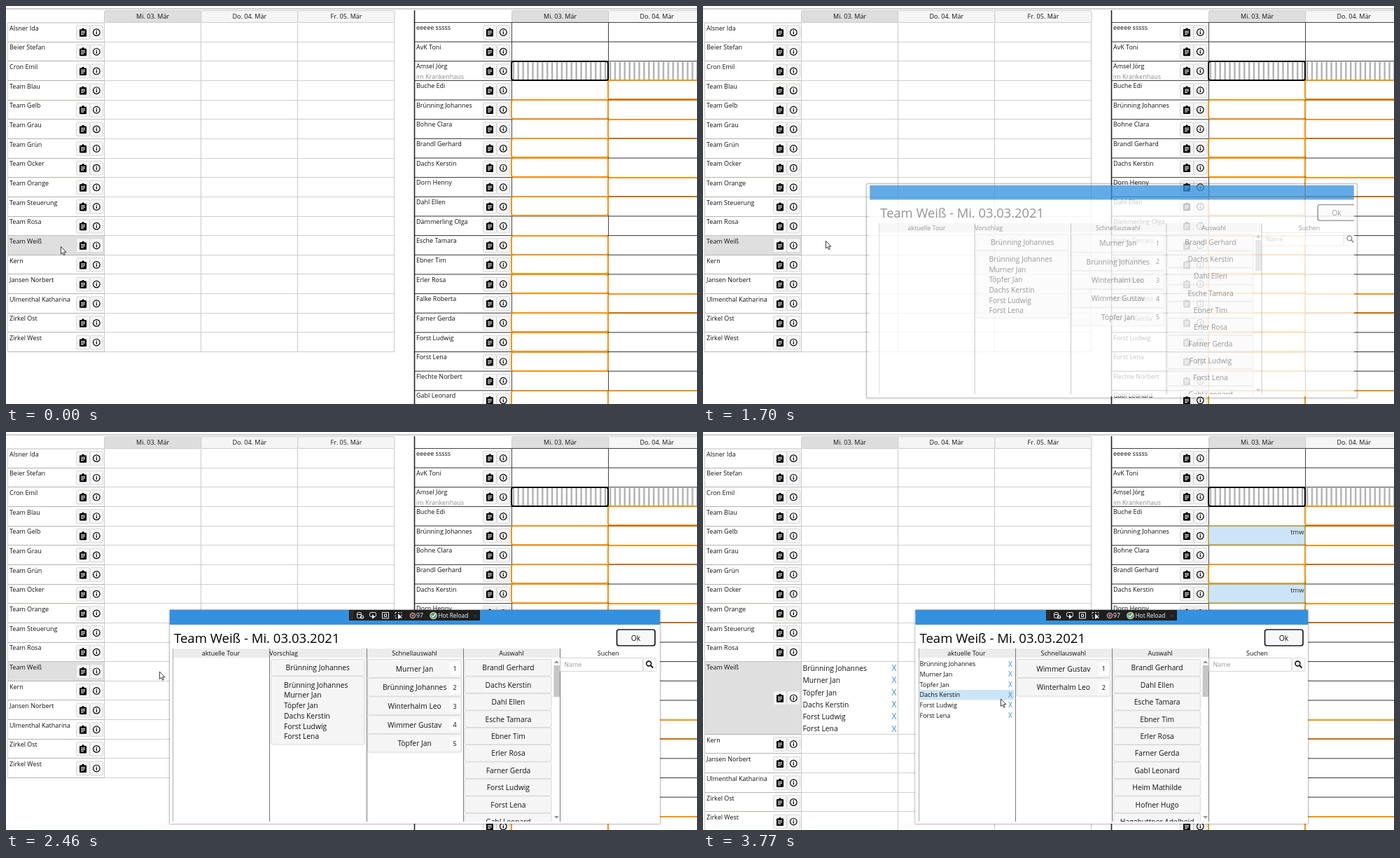
These frames come from a looping animation (987 by 568 pixels, 6090 ms). An HTML page with a canvas:

```html
<!DOCTYPE html>
<html lang="de">
<head>
<meta charset="utf-8">
<title>Tourenplan</title>
<style>
html, body { margin: 0; width: 100%; height: 100%; overflow: hidden; background: #fff; }
canvas { display: block; }
</style>
</head>
<body>
<canvas id="stage" width="987" height="568"></canvas>
<script>
const LOOP = 6090, STEP = 76.95;
const ROW = 27.65, TOP = 23.5, COL = 138.2, ENTRY = 17.28;
const BLUE = '#3391df', ORANGE = '#f7930f', PALE = '#cce4f7', FACE = '#f5f5f5', EDGE = '#d8d8d8';
const c = document.getElementById('stage').getContext('2d');

const staff = ['Alsner Ida', 'Beier Stefan', 'Cron Emil', 'Team Blau', 'Team Gelb', 'Team Grau', 'Team Grün',
  'Team Ocker', 'Team Orange', 'Team Steuerung', 'Team Rosa', 'Team Weiß', 'Kern', 'Jansen Norbert',
  'Ulmenthal Katharina', 'Zirkel Ost', 'Zirkel West'];
const clients = ['eeeee sssss', 'AvK Toni', 'Amsel Jörg', 'Buche Edi', 'Brünning Johannes', 'Bohne Clara',
  'Brandl Gerhard', 'Dachs Kerstin', 'Dorn Henny', 'Dahl Ellen', 'Dämmerling Olga', 'Esche Tamara',
  'Ebner Tim', 'Erler Rosa', 'Falke Roberta', 'Farner Gerda', 'Forst Ludwig', 'Forst Lena',
  'Flechte Norbert', 'Gabl Leonard'];
const tour = ['Brünning Johannes', 'Murner Jan', 'Töpfer Jan', 'Dachs Kerstin', 'Forst Ludwig', 'Forst Lena'];
const quick = ['Murner Jan', 'Brünning Johannes', 'Winterhalm Leo', 'Wimmer Gustav', 'Töpfer Jan'];
const quickLeft = ['Wimmer Gustav', 'Winterhalm Leo'];
const pool = [6, 7, 9, 11, 12, 13, 15, 16, 17, 19].map(i => clients[i])
  .concat('Heim Mathilde', 'Hofner Hugo', 'Hagebuttner Adelheid');
const openFirst = [4, 6, 7, 9, 11, 12, 13, 15, 16, 17, 19];
const openSecond = [3, 5, 8, 14, 19];
const ACTIVE = 11;

const clamp = v => Math.max(0, Math.min(1, v));
const smooth = v => v * v * (3 - 2 * v);

function text(s, x, mid, size = 9, color = '#111', align = 'left') {
  c.font = size + 'px "Open Sans", "Noto Sans", sans-serif';
  c.fillStyle = color;
  c.textAlign = align;
  c.fillText(s, x, mid + size * .36);
}
function fill(x, y, w, h, color) {
  c.fillStyle = color;
  c.fillRect(x, y, w, h);
}
function box(x, y, w, h, face, edge, width = 1, r = 2) {
  c.beginPath();
  c.roundRect(x, y, w, h, r);
  if (face) { c.fillStyle = face; c.fill(); }
  if (edge) { c.strokeStyle = edge; c.lineWidth = width; c.stroke(); }
}
function poly(points, face, edge, width = 1) {
  c.beginPath();
  points.forEach(([x, y]) => c.lineTo(x, y));
  c.closePath();
  if (face) { c.fillStyle = face; c.fill(); }
  if (edge) { c.strokeStyle = edge; c.lineWidth = width; c.stroke(); }
}
function ring(x, y, r, color, width) {
  c.beginPath();
  c.arc(x, y, r, 0, 7);
  c.strokeStyle = color;
  c.lineWidth = width;
  c.stroke();
}
function disc(x, y, r, color) {
  c.beginPath();
  c.arc(x, y, r, 0, 7);
  c.fillStyle = color;
  c.fill();
}

function rowButtons(x, y) {
  box(x - 9.5, y - 10, 19, 20, FACE, EDGE);
  box(x + 10, y - 10, 18.5, 20, FACE, EDGE);
  box(x - 5, y - 4.5, 10, 10.5, '#000', null, 0, 1);
  disc(x, y - 4.5, 1.7, '#000');
  [[-2, 6], [0.2, 6], [2.4, 4]].forEach(([dy, w]) => fill(x - 3, y + dy, w, 1.1, '#fff'));
  ring(x + 19.3, y, 4.8, '#000', 1.2);
  fill(x + 18.7, y - .8, 1.3, 3.4, '#000');
  fill(x + 18.7, y - 2.7, 1.3, 1.2, '#000');
}
function dayHeads(x, days) {
  days.forEach((day, i) => {
    box(x + i * COL, 6.5, COL, 17, i ? FACE : '#dedede', '#ccc');
    text(day, x + (i + .5) * COL, 14.5, 9, '#111', 'center');
  });
}

function staffGrid(count, hover) {
  const tall = Math.max(ROW, count * ENTRY);
  let y = TOP;
  dayHeads(140.5, ['Mi. 03. Mär', 'Do. 04. Mär', 'Fr. 05. Mär']);
  fill(2, TOP, 139, 1, '#bbb');
  staff.forEach((name, i) => {
    const h = i == ACTIVE ? tall : ROW;
    if (i == ACTIVE) {
      fill(3, y, 137, h, '#dfdfdf');
      if (hover) fill(141, y, 137, h, '#d6d6d6');
    }
    text(name, 5, y + 8);
    rowButtons(110, y + h / 2 + .3);
    if (i == ACTIVE) tour.slice(0, count).forEach((who, n) => {
      text(who, 142.5, y + 9.7 + n * ENTRY, 10.3);
      text('X', 273, y + 9.2 + n * ENTRY, 12, BLUE, 'center');
    });
    y += h;
    fill(2, Math.round(y - .5), 139, 1, '#b6b2ac');
    fill(141, Math.round(y - .5), 414, 1, '#d0d0d0');
  });
  [2, 140, 278, 416, 554].forEach(x => fill(x, TOP, 1, y - TOP, '#c8c8c8'));
}

function clientGrid(count) {
  const left = 722, mid = 860, rowY = i => TOP + i * ROW, edge = i => Math.round(rowY(i));
  const cell = (x, i, face, color) => box(x, edge(i), 138, 27, face, color, 2, 3);
  dayHeads(722.5, ['Mi. 03. Mär', 'Do. 04. Mär']);
  fill(582.7, 6, 1.6, 562, '#222');
  fill(584, 23, 403, 1, '#444');
  clients.forEach((name, i) => {
    const y = rowY(i);
    text(name, 586, y + 7.4);
    if (i == 2) text('im Krankenhaus', 586, y + 21.8, 9, '#8a8a8a');
    rowButtons(691, y + 14);
    fill(584, y + ROW - .6, 403, 1.1, '#444');
  });
  fill(722, TOP, 1, 545, '#444');
  fill(860, TOP, 1, 545, '#444');
  for (let x = 723.6; x < 987; x += COL / 20) fill(x, 80, 2.5, 26, '#b4b4b4');
  openFirst.forEach(i => cell(left, i, null, ORANGE));
  openSecond.forEach(i => {
    cell(mid, i, null, ORANGE);
    fill(mid + 1, edge(i + 1) - 1, COL, 2, '#c4700f');
  });
  [4, 7].forEach(i => {
    if (count <= tour.indexOf(clients[i])) return;
    cell(left, i, PALE, '#b9ad5c');
    text('tmw', 858.5, rowY(i) + 9, 9.3, '#222', 'right');
  });
  cell(left, 2, null, '#000');
}

function debugBar() {
  fill(490, 254, 187, 15, '#1f1f1f');
  for (let i = 0; i < 8; i++) fill(492 + i % 2 * 2.5, 256 + (i >> 1) * 3, 1, 1, '#888');
  const white = '#eee';
  box(501.5, 257.5, 6, 8, null, white);
  fill(502, 260, 5, 1, white);
  ring(508.5, 264, 2, white, 1.2);
  box(519.5, 257.5, 9, 6, null, white);
  poly([[523, 260], [523, 267], [527, 264]], white);
  box(537.5, 257.5, 9, 8.5, null, white, 1, 0);
  box(540.5, 260, 3, 3.5, null, white, 1, 0);
  c.setLineDash([2, 2]);
  box(556, 257.5, 9, 8, null, white, 1, 0);
  c.setLineDash([]);
  poly([[560, 259], [560, 267], [565, 264]], white);
  ring(581, 262, 3.6, '#bbb', 1.2);
  disc(581, 262, 2, '#d65a50');
  text('97', 586, 262, 8.7, '#fff');
  disc(610.5, 262, 5.3, '#ddd');
  disc(610.5, 262, 4.2, '#55a05a');
  c.beginPath();
  [[608, 262], [610, 264.2], [613.5, 259.5]].forEach(p => c.lineTo(...p));
  c.strokeStyle = '#fff';
  c.lineWidth = 1.3;
  c.stroke();
  text('Hot Reload', 617.5, 262, 8.3, '#fff');
  text('<', 670, 262, 8, '#666', 'center');
}

function dialogBody(x, w, s) {
  const right = x + w, heads = ['aktuelle Tour', 'Schnellauswahl', 'Auswahl', 'Suchen'];
  if (!s.done) heads.splice(1, 0, 'Vorschlag');
  text(`${staff[ACTIVE]} - Mi. 03.03.2021`, x + 6, 294.5, 18.55, '#000');
  const focusOk = !s.focusList;
  box(right - 61.5, 282, 54.5, 23, focusOk ? '#f8f8f8' : FACE, focusOk ? '#1c1c24' : '#ccc', focusOk ? 1.7 : 1, 3);
  text('Ok', right - 34.5, 294, 10.5, '#111', 'center');

  const colX = i => x + 4 + i * 138.3;
  fill(colX(0), 309, (heads.length - 1) * 138.3, 13, '#ececec');
  heads.forEach((head, i) => {
    const suggest = head == 'Vorschlag';
    text(head, suggest ? colX(i) : colX(i) + 69, 315.5, 9, '#111', suggest ? 'left' : 'center');
    fill(Math.round(colX(i)), 309, 1, 247, i ? '#777' : '#aaa');
  });

  tour.slice(0, s.count).forEach((who, i) => {
    const y = 331 + i * 14.7;
    if (s.done && i == 3) fill(x + 5, y - 7, 136, 14.3, PALE);
    text(who, x + 6, y);
    text('X', x + 135.5, y, 10, BLUE, 'center');
  });

  let col = 1;
  if (!s.done) {
    const sx = colX(col++);
    box(sx + 2.2, 324.5, 133.5, 23.5, FACE, EDGE);
    text(tour[0], sx + 69, 336.7, 10.3, '#111', 'center');
    box(sx + 2.2, 348.5, 133.5, 97.5, s.hoverList ? '#e0e0e0' : FACE, s.focusList ? '#16161c' : EDGE, s.focusList ? 2 : 1, 3);
    tour.forEach((who, i) => text(who, sx + 20.7, 361 + i * 14.75, 10.3));
  }

  const qx = colX(col++);
  (s.done ? quickLeft : quick).forEach((who, i) => {
    const y = 324.5 + i * 26.65;
    box(qx + 2.5, y, 133.5, 26, FACE, EDGE);
    text(who, qx + 69, y + 13.5, 10.3, '#111', 'center');
    fill(qx + 119, y + 4, 15, 18, '#fcfcfc');
    text(i + 1, qx + 126.5, y + 13.5, 9, '#111', 'center');
  });

  const px = colX(col++);
  c.save();
  c.beginPath();
  c.rect(px, 322, 139, 234);
  c.clip();
  pool.filter(who => !s.done || !tour.includes(who)).slice(0, 10).forEach((who, i) => {
    const y = 324.5 + i * 24.4;
    box(px + 2.3, y, 124, 23.8, FACE, EDGE);
    text(who, px + 64.5, y + 12.2, 10.3, '#111', 'center');
  });
  c.restore();
  poly([[px + 130, 330], [px + 133.5, 326], [px + 137, 330]], '#999');
  poly([[px + 130, 548], [px + 133.5, 552], [px + 137, 548]], '#999');
  fill(px + 129.5, 333, 8.5, 45, '#c6c6c6');

  const fx = colX(col);
  box(fx + .5, 322.5, 118, 19, '#fff', '#d5d5d5', 1, 0);
  text('Name', fx + 6, 332, 9, '#999');
  box(fx + 119, 322.5, 18.5, 19, '#fafafa', '#ddd');
  ring(fx + 127, 330.5, 3.4, '#111', 1.6);
  poly([[fx + 129.5, 333], [fx + 133, 336.6]], null, '#111', 2);
}

function dialog(k, s) {
  const shown = clamp((k - 20) * .38), scale = 1 - .05 * (1 - shown);
  const slide = (1 - clamp((k - 20.5) / 6.3)) ** 2;
  const x = s.done ? 303.5 : 234, w = s.done ? 560.5 : 700;
  // The frame stands still while the window inside it grows.
  box(x - 1, 253.5, w + 2, 306.5, null, 'rgba(0,0,0,.05)', 4);
  box(x - .5, 253.5, w + 1, 306, null, 'rgba(0,0,0,.2)');
  c.save();
  c.translate(584, 407);
  c.scale(scale, scale);
  c.translate(-584, -407);
  c.globalAlpha = shown;
  fill(x, 254, w, 21, BLUE);
  fill(x, 275, w, 284, '#fff');
  c.beginPath();
  c.rect(x, 275, w, 284);
  c.clip();
  c.globalAlpha = 1 - slide;
  c.translate(slide * 16, 0);
  dialogBody(x, w, s);
  c.restore();
  if (k >= 24) debugBar();
}

function pointer(k) {
  const glide = (u, x0, y0, x1, y1) => [x0 + (x1 - x0) * u, y0 + (y1 - y0) * u];
  if (k <= 8) return glide(smooth(k / 8), 78, 343, 173, 335);
  if (k <= 30) return [175, 335];
  if (k <= 37) return glide(smooth((k - 30) / 7), 175, 335, 397, 368);
  return k == 38 ? [413, 374] : [425, 380.5];
}
function arrow(x, y) {
  const shape = [[0, 0], [0, 10.6], [2.4, 8.4], [4.1, 12.2], [5.8, 11.4], [4.2, 7.8], [7.6, 7.8]];
  poly(shape.map(([dx, dy]) => [x + dx + .4, y + dy + .4]), '#fff', '#222', .9);
}

function draw(t) {
  const k = Math.floor((t + 12) / STEP);
  const [x, y] = pointer(k);
  const s = {
    done: k >= 49,
    count: k < 45 ? 0 : k >= 49 ? 6 : [1, 2, 3, 5][k - 45],
    focusList: k >= 40 && k < 49,
    hoverList: x > 379 && y > 348
  };
  fill(0, 0, 987, 568, '#fff');
  fill(0, 3, 987, 2, '#cfcfcf');
  staffGrid(s.count, x > 140 && k < 21);
  clientGrid(s.count);
  if (k >= 21) dialog(k, s);
  if (k == 14 || k == 15 || k == 40) disc(x - .3, y, 8.5, 'rgba(255,255,0,.47)');
  arrow(x, y);
}

const start = performance.now();
function frame() {
  draw((performance.now() - start) % LOOP);
  requestAnimationFrame(frame);
}
frame();
</script>
</body>
</html>
```
